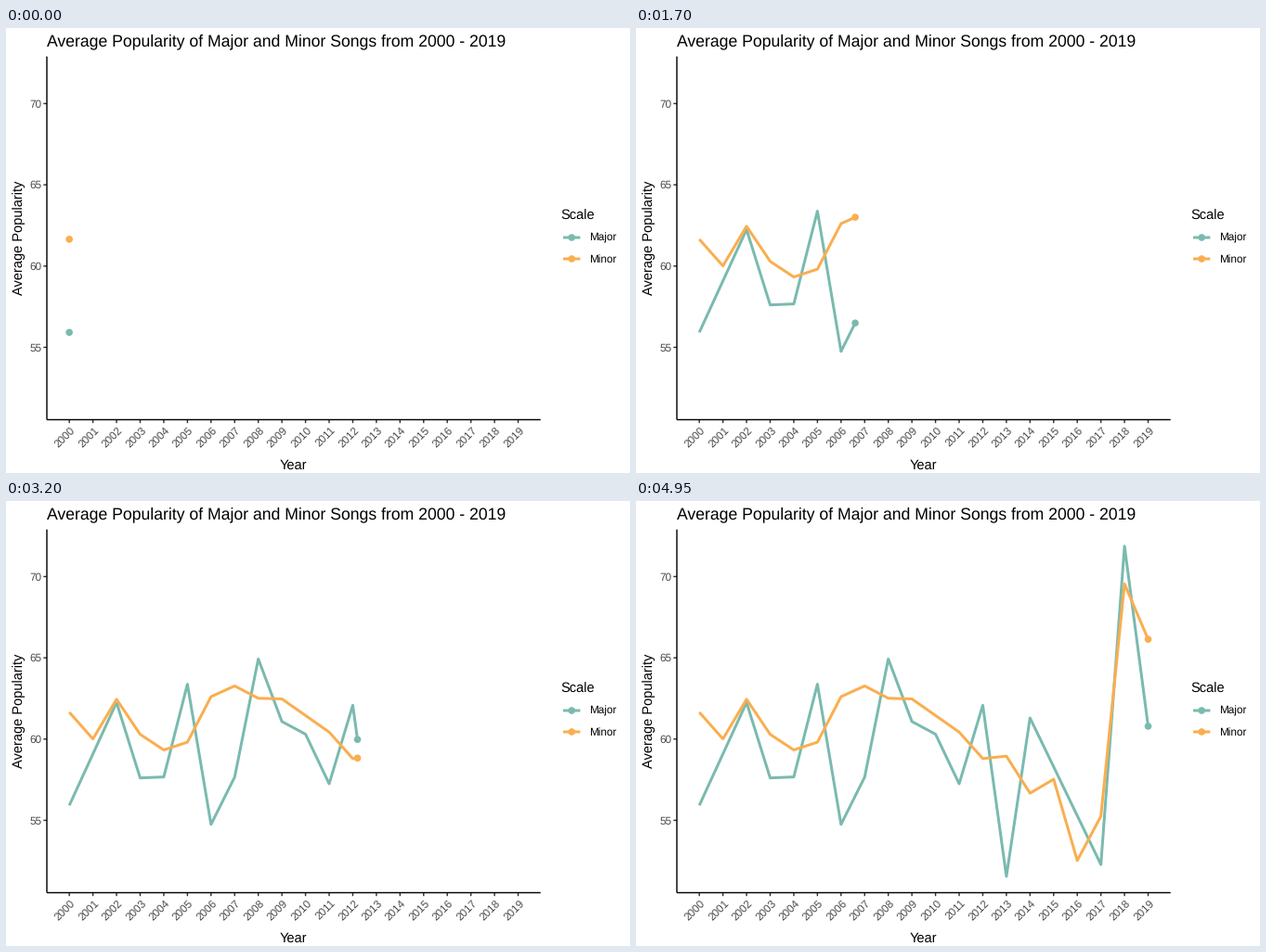
A matplotlib script for the animation above (8 s loop, 672 by 480 pixels).

```python
import numpy as np
import matplotlib.pyplot as plt
from matplotlib.animation import FuncAnimation

W, H, DPI = 672, 480, 96
FRAMES, INTERVAL = 160, 50
LAST = 99                       # frame on which the reveal is complete
PT = 72 / DPI                   # points per pixel

LEFT, RIGHT, TOP, BOTTOM = 44.0, 575.7, 30.7, 422.5
TEAL, ORANGE, GREY, TICK = "#7ABAAF", "#FAAE4F", "#4D4D4D", "#333333"
AXIS_W, LINE_W, DOT_R = 1.42, 3.0, 3.8

# Turning points by year; a gap lies on the straight run between its neighbours
GAP = np.nan
MAJOR = [55.92, GAP, 62.25, 57.61, 57.67, 63.38, 54.75, 57.66, 64.93, 61.08,
         60.30, 57.25, 62.08, 51.55, 61.30, GAP, GAP, 52.28, 71.87, 60.79]
MINOR = [61.65, 60.01, 62.45, 60.29, 59.33, 59.81, 62.61, 63.27, 62.51, 62.47,
         GAP, 60.43, 58.80, 58.95, 56.67, 57.53, 52.53, 55.25, 69.55, 66.14]

plt.rcParams["font.family"] = "Liberation Sans"
plt.rcParams["text.hinting"] = "none"

fig = plt.figure(figsize=(W / DPI, H / DPI), dpi=DPI, facecolor="white")
ax = fig.add_axes([0, 0, 1, 1])
ax.set_xlim(0, W)
ax.set_ylim(H, 0)
ax.axis("off")

years = np.arange(20)
# Each year is reached on a whole frame; motion between years is linear
keys = np.rint(LAST * years / years[-1])


def year_x(k):
    return LEFT + (k + 0.95) * (RIGHT - LEFT) / 20.9


def value_y(v):
    return 81.5 + (70 - v) * 17.53


def fill_gaps(data):
    data = np.array(data)
    known = ~np.isnan(data)
    return np.interp(years, years[known], data[known])


def stroke(xs, ys, color, width, z=1):
    line, = ax.plot(xs, ys, color=color, lw=width * PT, zorder=z, snap=False,
                    solid_capstyle="butt", solid_joinstyle="round")
    return line


def dot(x, y, color, z=4):
    return ax.add_patch(plt.Circle((x, y), DOT_R, color=color, lw=0, zorder=z))


def label(x, y, text, size, color="black", ha="left", angle=0):
    ax.text(x, y, text, fontsize=size, color=color, ha=ha, va="baseline",
            rotation=angle, rotation_mode="anchor")


# Axes
stroke([LEFT, LEFT], [TOP, BOTTOM], "black", AXIS_W)
stroke([LEFT, RIGHT], [BOTTOM, BOTTOM], "black", AXIS_W)
for v in range(55, 71, 5):
    y = value_y(v)
    stroke([LEFT - 3.67, LEFT], [y, y], TICK, AXIS_W, 0)
    label(LEFT - 5.8, y + 4.2, str(v), 8.8, GREY, "right")
for k in years:
    x = year_x(k)
    stroke([x, x], [BOTTOM, BOTTOM + 3.67], TICK, AXIS_W, 0)
    label(x + 6.9, BOTTOM + 12, str(2000 + k), 8.8, GREY, "right", 45)

# Titles
label(LEFT, 19, "Average Popularity of Major and Minor Songs from 2000 - 2019", 13.2)
label((LEFT + RIGHT) / 2, 476, "Year", 11, ha="center")
label(18, (TOP + BOTTOM) / 2, "Average Popularity", 11, ha="center", angle=90)

# Legend keys and the two moving series
label(597.7, 207, "Scale", 11)
series = []
for i, (name, data, color) in enumerate((("Major", MAJOR, TEAL),
                                         ("Minor", MINOR, ORANGE))):
    y = 226 + 23 * i
    stroke([600, 618.4], [y, y], color, LINE_W)
    dot(609.2, y, color)
    label(628, y + 4, name, 8.8)

    ys = value_y(fill_gaps(data))
    series.append((ys, stroke([], [], color, LINE_W, 2 + i),
                   dot(year_x(0), ys[0], color, 5 + i)))


def update(frame):
    pos = np.interp(frame, keys, years)
    done = int(pos) + 1
    head_x = year_x(pos)
    artists = []
    for ys, line, point in series:
        head_y = np.interp(pos, years, ys)
        line.set_data(np.append(year_x(years[:done]), head_x),
                      np.append(ys[:done], head_y))
        point.center = head_x, head_y
        artists += [line, point]
    return artists


anim = FuncAnimation(fig, update, frames=FRAMES, interval=INTERVAL,
                     init_func=lambda: update(0), repeat=True, blit=False)
plt.show()
```
